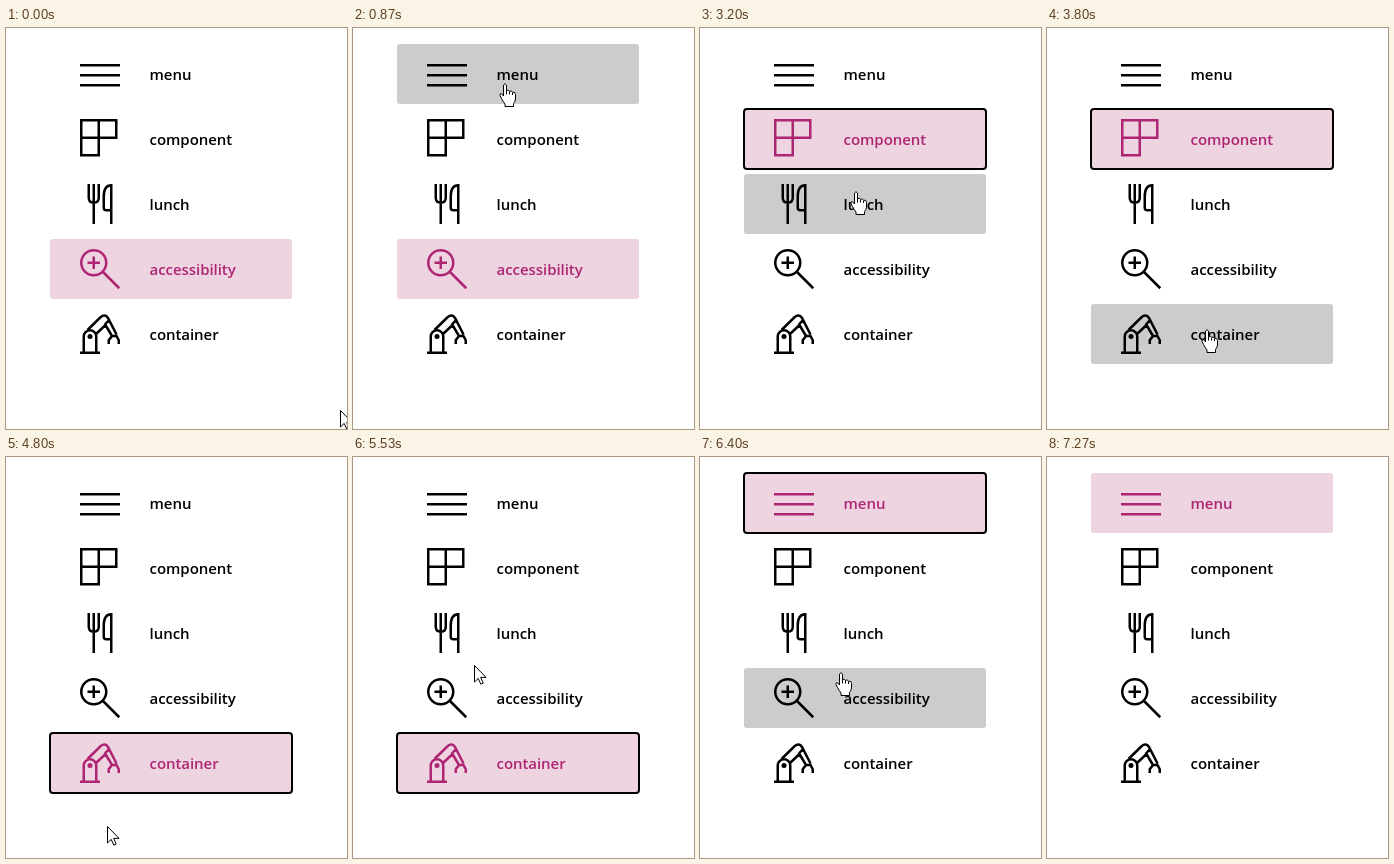
Write an HTML page that moves like this. It is 341 px wide and 401 px high and loops after 7.87 s.

```html
<!DOCTYPE html>
<html lang="en">
<head>
<meta charset="utf-8">
<title>Menu hover and selection</title>
<style>
  html, body { margin: 0; width: 100%; height: 100%; overflow: hidden; background: #fff; }
  svg { display: block; }
  text { font: 600 15px "Open Sans", "Noto Sans", sans-serif; letter-spacing: -.06px; fill: currentColor; }
  .icon { fill: none; stroke: currentColor; stroke-width: 2; }
  .cursor path { fill: #fff; stroke: #000; stroke-linejoin: round; }
</style>
</head>
<body>
<svg width="341" height="401" viewBox="0 0 341 401">
  <g id="list"></g>
  <g id="arrow" class="cursor"><path d="M.5.5V17L4.2 13.4L6.8 19.2L9.2 18.1L6.7 12.4H12Z"/></g>
  <g id="hand" class="cursor">
    <path d="M-1.5 1Q0-1.6 1.5 1V6.5Q3.5 5.5 4.5 7.3Q6.5 6.3 7.5 8.2Q10.5 7.5 10.5 10.5V15Q10 18 8.5 19.5V22.5H0V20Q-2 17.5-3.5 14.5L-5 11.5Q-5.3 9.3-3.5 9.7L-1.5 12Z"/>
    <path d="M1.5 6.5V10.5M4.5 7.5V10.5M7.5 8.5V11"/>
  </g>
</svg>
<script>
const LOOP = 7870, TICK = 200 / 3;
const LEFT = 44, TOP = 16, WIDTH = 242, HEIGHT = 60, PITCH = 65;
const ACCENT = "#ae2573", ACCENT_DARK = "#8b1e5c";
const $ = id => document.getElementById(id);

// Icons are drawn on a 32-unit grid
const entries = [
  ["menu", '<path d="M0 9H32M0 17H32M0 25H32"/>'],
  ["component", '<path d="M1 1H29V15H1ZM15 1V29H1V15"/>'],
  ["lunch", '<path d="M7 0V11Q7 15 11 15T15 11V0M11 0V32M25 32V1Q19 1 19 10V19Q19 21 21 21H25"/>'],
  ["accessibility", '<circle cx="11" cy="11" r="10"/><path d="M6 11H16M11 6V16M18 18L31.4 31.4"/>'],
  ["container", '<path d="M0 31H16M3 31V18a5 5 0 0 1 10 0V31M6 12.8L16.4 2.6Q20-.4 22.4 3.2L29.2 16.4M12.8 16L20.4 8.8L25.6 17.6M19.6 8.8L23.2 4.8M23 24V21L25.6 17.6H29.2L31 21V24"/><circle cx="8" cy="18" r="2" fill="currentColor" stroke="none"/>']
];

$("list").innerHTML = entries.map(([label, icon], i) => `
  <g transform="translate(0 ${TOP + i * PITCH})">
    <rect x="${LEFT}" width="${WIDTH}" height="${HEIGHT}" rx="3" stroke-width="2"/>
    <g class="icon" transform="translate(74 10) scale(1.25)">${icon}</g>
    <text x="143.6" y="36">${label}</text>
  </g>`).join("");
const items = [...$("list").children];

// The pointer rests between eased moves
const moves = [
  { from: 0, to: 13, x: 152, y: 56 },
  { from: 22, to: 30, x: 154, y: 115 },
  { from: 43, to: 58, x: 160, y: 304 },
  { from: 66, to: 74, x: 90, y: 381 },
  { from: 74, to: 78, x: 112, y: 306 },
  { from: 80, to: 87, x: 134, y: 57 },
  { from: 91, to: 102, x: 150, y: 425 }
];

// Pressing focuses an item; releasing selects it
const clicks = [{ tick: 17, item: 0 }, { tick: 39, item: 1 }, { tick: 61, item: 4 }, { tick: 88, item: 0 }];
const HOLD = 2, BLUR = 109, FIRST_SELECTED = 3;
const clickedBy = tick => clicks.findLast(click => click.tick <= tick)?.item;

const ease = u => u * u * (3 - 2 * u);

function pointer(tick) {
  let x = 334, y = 382;
  for (const move of moves) {
    const u = ease(Math.min(1, Math.max(0, (tick - move.from) / (move.to - move.from))));
    x += (move.x - x) * u;
    y += (move.y - y) * u;
  }
  return [Math.round(x), Math.round(y)];
}

function draw(ms) {
  const tick = Math.floor((Math.floor(ms / 10) * 10 + 3.4) / TICK);
  const [x, y] = pointer(tick);
  const selected = clickedBy(tick - HOLD) ?? FIRST_SELECTED;
  const focused = tick < BLUR ? clickedBy(tick) : undefined;
  let overItem = false;

  items.forEach((item, i) => {
    const top = TOP + i * PITCH;
    const hover = x >= LEFT && x < LEFT + WIDTH && y >= top && y < top + HEIGHT;
    const chosen = i === selected;
    overItem ||= hover;
    item.style.color = chosen ? (hover ? ACCENT_DARK : ACCENT) : "#000";
    const box = item.firstElementChild;
    box.setAttribute("fill", hover ? "#ccc" : chosen ? "#edd4e0" : "none");
    box.setAttribute("stroke", i !== focused ? "none" : chosen && hover ? "#9f2266" : "#000");
  });

  for (const [id, shown] of [["hand", overItem], ["arrow", !overItem]]) {
    $(id).setAttribute("transform", `translate(${x} ${y})`);
    $(id).setAttribute("visibility", shown ? "visible" : "hidden");
  }
}

const start = performance.now();
function frame() {
  draw((performance.now() - start) % LOOP);
  requestAnimationFrame(frame);
}
frame();
</script>
</body>
</html>
```
